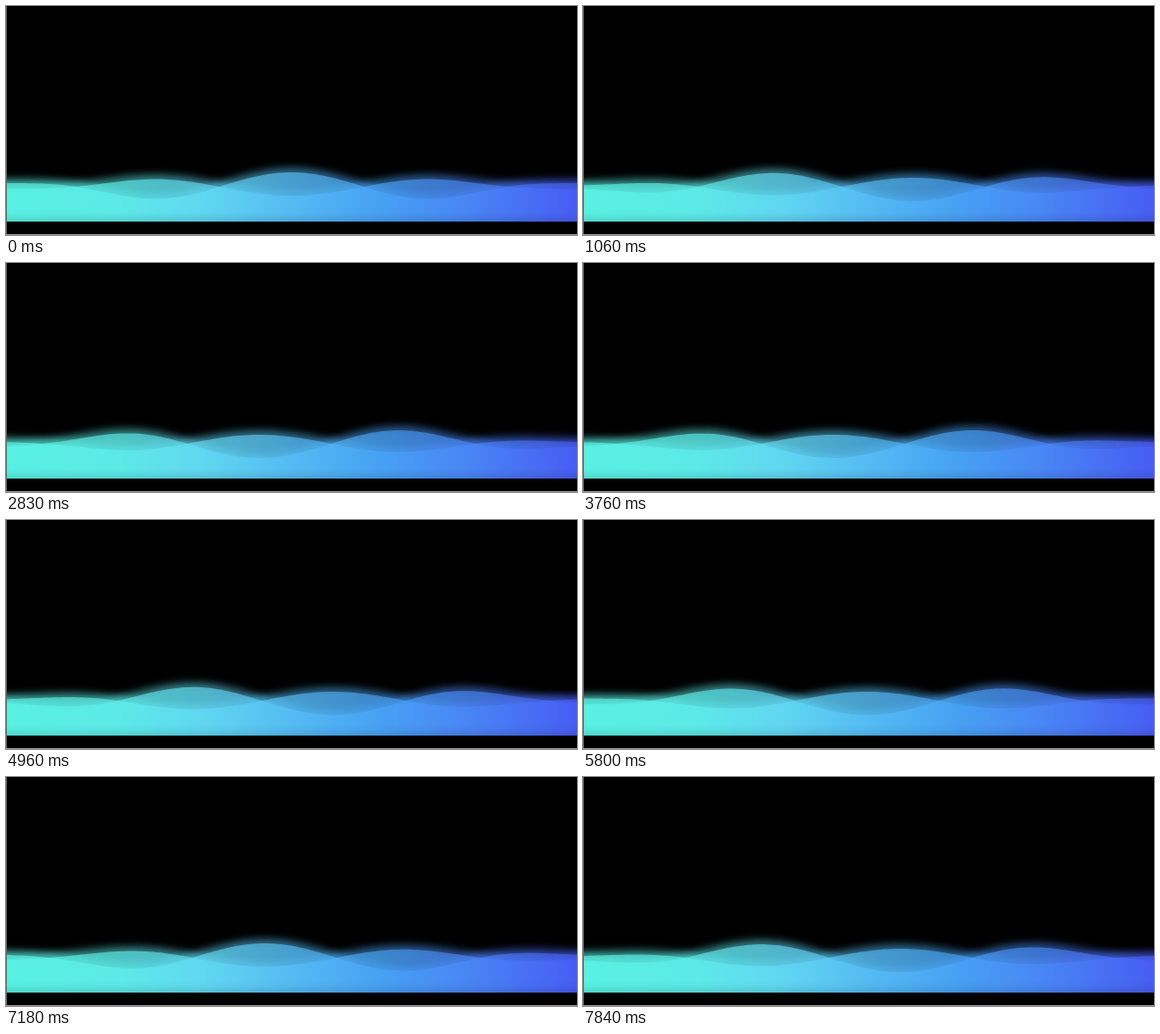
An HTML page for the animation above (7.99 s loop, 636 by 256 pixels).

```html
<!DOCTYPE html>
<html lang="en">
<head>
<meta charset="utf-8">
<title>Waves</title>
<style>
  html, body { margin: 0; width: 100%; height: 100%; overflow: hidden; background: #000; }
  svg { display: block; width: 636px; height: 256px; }
  .glow { opacity: .53; filter: url(#soft); }
  .body { opacity: .6; }
</style>
</head>
<body>
<svg viewBox="0 0 636 256">
  <defs>
    <linearGradient id="tint" gradientUnits="userSpaceOnUse" x1="0" y1="0" x2="636" y2="0">
      <stop offset="0" stop-color="#5cfaea"/>
      <stop offset=".2" stop-color="#60f2f0"/>
      <stop offset=".35" stop-color="#64defa"/>
      <stop offset=".5" stop-color="#58c2fc"/>
      <stop offset=".66" stop-color="#4aa6fc"/>
      <stop offset=".82" stop-color="#4c88fe"/>
      <stop offset="1" stop-color="#4a60fc"/>
    </linearGradient>
    <filter id="soft" filterUnits="userSpaceOnUse" x="-60" y="130" width="756" height="160" color-interpolation-filters="sRGB">
      <feGaussianBlur stdDeviation="4.5"/>
      <feOffset dy="-5"/>
    </filter>
    <clipPath id="frame"><rect width="636" height="241"/></clipPath>
    <path id="tall"/>
    <path id="low"/>
  </defs>
  <rect width="636" height="256"/>
  <g fill="url(#tint)" clip-path="url(#frame)">
    <use href="#low" class="glow"/>
    <use href="#low" class="body"/>
    <use href="#tall" class="glow"/>
    <use href="#tall" class="body"/>
  </g>
  <rect width="1" height="256" fill="#6b6368"/>
  <rect y="255" width="636" height="1" fill="#a39a9f"/>
</svg>
<script>
  const LOOP = 7990, STEP = 135.5, START = 77.5, LEAD = 34;
  const SPEED = .3345, PAUSE_AT = 630, PAUSE = 530;
  const WIDTH = 636, MID = 318, BASE = 202, FLOOR = 241, PERIOD = 321, EDGE = 40;
  const tall = document.getElementById('tall');
  const low = document.getElementById('low');

  const clamp = (v, min, max) => Math.min(max, Math.max(min, v));

  // The picture advances in even steps
  function stepTime(t) {
    const k = Math.floor((t - START) / STEP);
    return Math.max(0, START + LEAD + k * STEP);
  }

  // Steady drift to the right with one rest
  const shiftAt = t => SPEED * (t - clamp(t - PAUSE_AT, 0, PAUSE));

  // Full height in the middle, a quarter at the sides
  function envelope(x) {
    const d = Math.min(1, Math.abs(x - MID) / MID);
    return .25 + .375 * (1 + Math.cos(Math.PI * d ** 1.7));
  }

  function wave(height, shift) {
    let d = `M${-EDGE} ${FLOOR}`;
    for (let x = -EDGE; x <= WIDTH + EDGE; x += 4) {
      const y = BASE - height * envelope(x) * Math.cos(2 * Math.PI * (x - MID - shift) / PERIOD);
      d += `L${x} ${y.toFixed(2)}`;
    }
    return `${d}V${FLOOR}Z`;
  }

  function draw() {
    const shift = shiftAt(stepTime(performance.now() % LOOP));
    tall.setAttribute('d', wave(16, shift));
    low.setAttribute('d', wave(-10, shift));
    requestAnimationFrame(draw);
  }
  draw();
</script>
</body>
</html>
```
